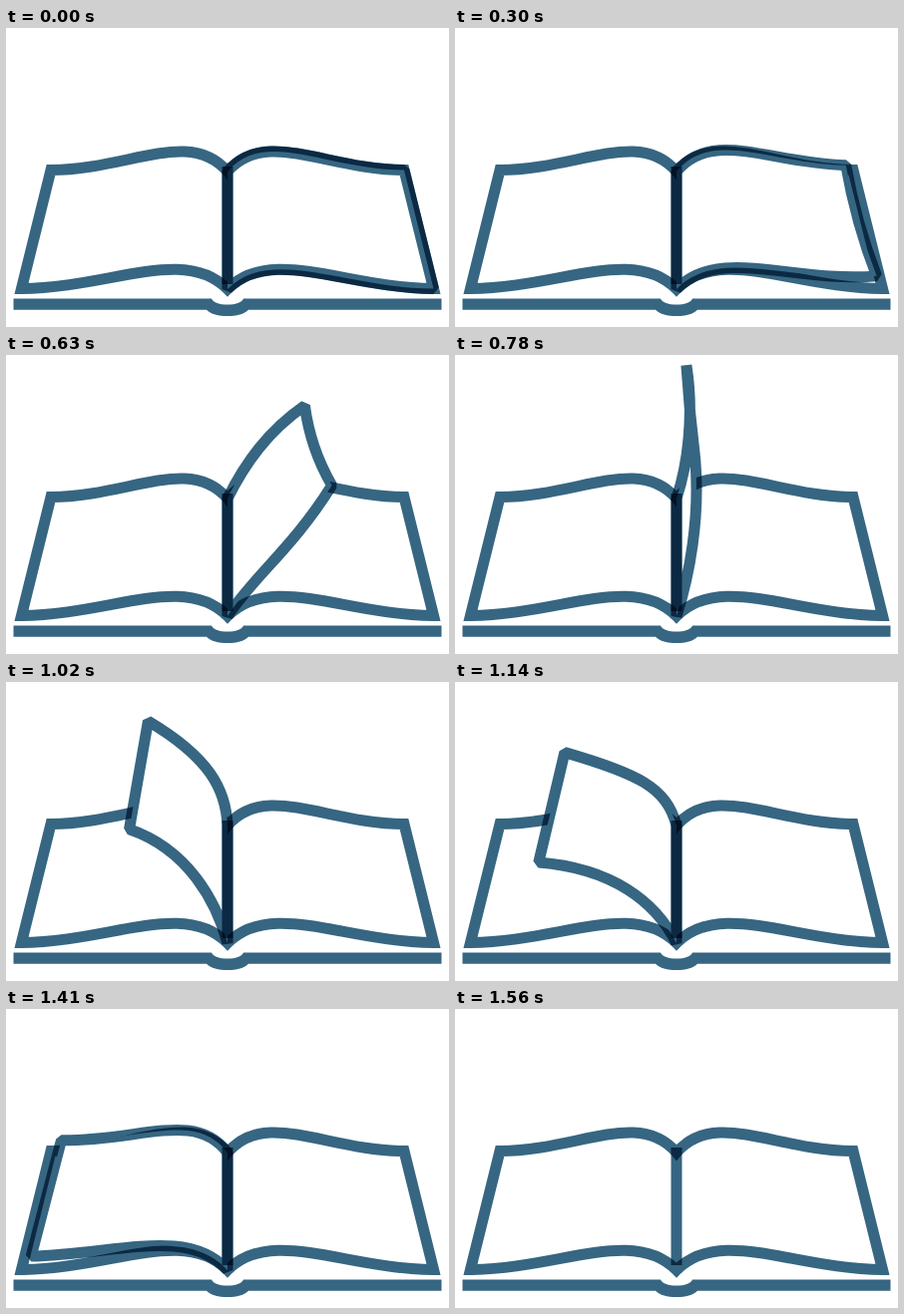
Animation, 444 px wide and 300 px high, one loop 1680 ms. Source, as an HTML page:

```html
<!DOCTYPE html>
<html lang="en">
<head>
<meta charset="utf-8">
<title>Page turning in a book</title>
<style>
  html, body { margin: 0; width: 100%; height: 100%; overflow: hidden; background: #fff; }
  svg { display: block; width: 100vw; height: 100vh; isolation: isolate; background: #fff; }
  .line { fill: none; stroke: #366682; stroke-width: 11; }
  .cover { fill: #366682; }
  .blend { mix-blend-mode: multiply; }
  #fill { fill: #fff; }
  #edge { stroke-linejoin: bevel; }
</style>
</head>
<body>
<svg viewBox="0 0 444 300">
  <path class="cover" d="M7.5 271.5H206C208 275.5 214 277.5 222 277.5S236 275.5 238 271.5H436.5V282.7H243C239 287 231 289 222 289S205 287 201 282.7H7.5Z"/>
  <path id="book" class="line"/>
  <g id="page">
    <path id="fill"/>
    <path id="edge" class="line blend"/>
  </g>
  <path class="line blend" d="M222 139V257"/>
</svg>
<script>
  const LOOP = 1680, STEP = 30, START = 175, END = 1565, HIDE = 1560;
  const MID = 222, TOP = 144, BOTTOM = 262;
  const $ = id => document.getElementById(id);

  // Each point swings over the spine on an arc from its reach on the right to the
  // same reach on the left. Lean and twist bend the arc sideways; lift raises it,
  // tilt and sag make the rise uneven.
  const topEdge = [
    { reach: 38, base: 100, lean: 10, twist: -20, lift: -10 },
    { reach: 98, base: 142, lean: 14, twist: -40, lift: 82 },
    { reach: 177, base: 142.5, lean: -2, lift: 134, tilt: -15, sag: 64 }
  ];
  const bottomEdge = [
    { reach: 43, base: 218, lean: 10, lift: -4 },
    { reach: 118, base: 261, lean: 16, lift: 100, tilt: -35 },
    { reach: 206.5, base: 261.5, lean: 3, twist: 28, lift: 156, tilt: 25, sag: 20 }
  ];

  function swing({ reach, base, lean = 0, twist = 0, lift = 0, tilt = 0, sag = 0 }, angle) {
    const c = Math.cos(angle), up = Math.sin(angle) ** 2;
    return [
      MID + reach * c + up * (lean + twist * c),
      base - up * (lift + tilt * c - sag * c * c)
    ];
  }

  // Top edge outwards, bowed side, bottom edge back to the spine.
  function outline(angle) {
    const [a, b, top] = topEdge.map(p => swing(p, angle));
    const [c, d, low] = bottomEdge.map(p => swing(p, angle));
    const bow = 10 * Math.max(0, Math.sin(2 * angle));
    const side = [(top[0] + low[0]) / 2 - bow, (top[1] + low[1]) / 2 + bow / 3];
    return `M${MID} ${TOP}C${[a, b, top]}Q${[side, low]}C${[d, c]},${MID},${BOTTOM}`;
  }

  // Even turn that runs slightly ahead while the page is upright.
  function angleAt(t) {
    const u = Math.min(1, Math.max(0, (t - START) / (END - START)));
    return Math.PI * u + 0.148 * Math.sin(Math.PI * u) ** 4;
  }

  // Both resting pages as one shape without the spine.
  function bookPath() {
    const flat = (edge, angle) => edge.map(p => swing(p, angle));
    const [a, b, top] = flat(topEdge, Math.PI);
    const [c, d, low] = flat(bottomEdge, Math.PI);
    return outline(0) + `C${[c, d, low]}L${top}C${[b, a]},${MID},${TOP}Z`;
  }

  function draw(now) {
    const t = Math.floor(now % LOOP / STEP) * STEP;
    const d = outline(angleAt(t)) + 'Z';
    $('fill').setAttribute('d', d);
    $('edge').setAttribute('d', d);
    $('page').style.display = t < HIDE ? '' : 'none';
  }

  function tick() {
    draw(performance.now());
    requestAnimationFrame(tick);
  }

  $('book').setAttribute('d', bookPath());
  tick();
</script>
</body>
</html>
```
